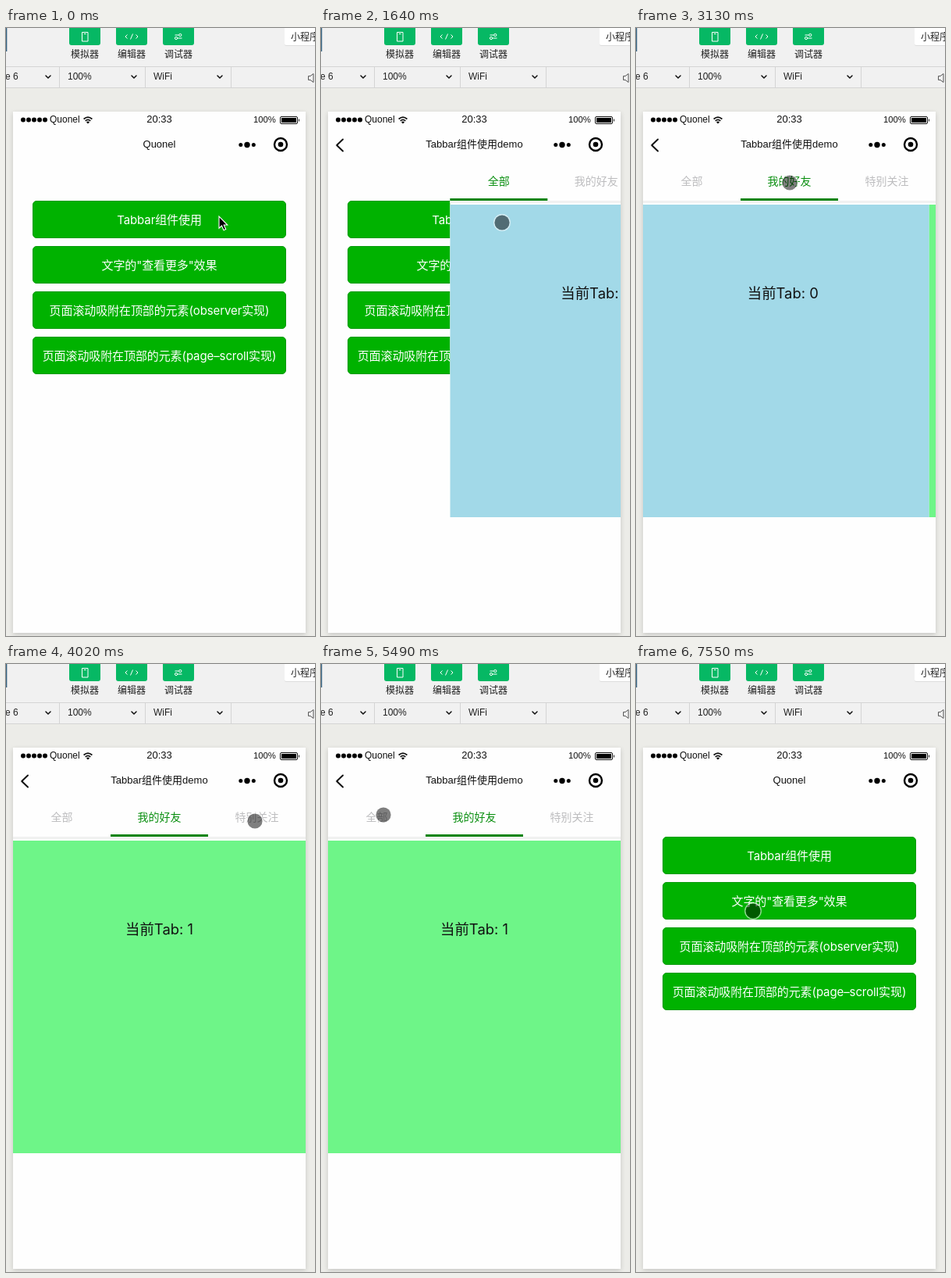
Recreate the animation shown at these times as an HTML page. Size 396x778 px, loop 8 s.

```html
<!DOCTYPE html>
<html lang="zh">
<head>
<meta charset="utf-8">
<title>Tab demo</title>
<style>
html, body { margin: 0; width: 100%; height: 100%; overflow: hidden; background: #ecece8; }
svg { display: block; width: 396px; height: 778px; }
text { font-family: "Liberation Sans", "Noto Sans CJK SC", "Noto Sans CJK", sans-serif; fill: #111; white-space: pre; }
.mid { text-anchor: middle; }
.web { font-family: Inter, "Noto Sans CJK SC", "Noto Sans CJK", sans-serif; }
.btn { font-size: 15px; letter-spacing: -.1px; fill: #fff; }
.tab { font-size: 14px; }
.pane { font-size: 18.4px; }
.tool { font-size: 12px; fill: #222; }
.line { fill: none; stroke: #111; stroke-linecap: round; stroke-linejoin: round; }
</style>
</head>
<body>
<svg id="stage" viewBox="0 0 396 778">
  <defs>
    <clipPath id="screen"><rect x="9" y="171" width="375" height="603"/></clipPath>
    <clipPath id="swiper"><rect x="9" y="226" width="375" height="400"/></clipPath>
    <filter id="soft" x="-10%" y="-10%" width="120%" height="120%"><feGaussianBlur stdDeviation="3"/></filter>
  </defs>

  <rect width="396" height="778" fill="#ecece8"/>
  <rect width="396" height="77" fill="#f1f1f1"/>
  <path d="M0 49.5H396M0 76.5H396M68.5 50V76M178.5 50V76M288.5 50V76" stroke="#d4d4d4"/>
  <rect width="1.3" height="30" fill="#33617f"/>
  <g id="tools"></g>
  <g fill="none" stroke="#fff" stroke-width="1">
    <path d="M97.5 5.500H105V17H97.500ZM100 7.500H102.500"/>
    <path d="M155.500 8.500L153 11L155.500 13.500M166.500 8.500L169 11L166.500 13.500M162.500 7.500L159.500 14.500"/>
    <path d="M216.500 9H221.500M219.500 13H225.500"/>
    <circle cx="223.300" cy="9" r="1.600"/><circle cx="218" cy="13" r="1.600"/>
  </g>
  <rect x="357" y="-4" width="50" height="27" rx="2" fill="#ddd"/>
  <rect x="357" y="-4" width="50" height="26" rx="2" fill="#fff"/>
  <text class="tool" x="365" y="16">小程序</text>
  <text class="tool" x="-1" y="66">e 6</text>
  <text class="tool" x="79" y="66">100%</text>
  <text class="tool" x="189" y="66">WiFi</text>
  <path class="line" stroke-width="1.500" d="M51 61L54 64L57 61M161 61L164 64L167 61M271 61L274 64L277 61"/>
  <path d="M387.500 61.500H390L394 58.500V69.500L390 66.500H387.500Z" fill="none" stroke="#555"/>

  <rect x="9" y="109" width="375" height="667" fill="#000" opacity=".16" filter="url(#soft)"/>
  <rect x="9" y="107" width="375" height="667" fill="#fefefe"/>

  <g id="signal"></g>
  <text x="56" y="121" font-size="12">Quonel</text>
  <g class="line" stroke-width="1.700" style="stroke-linecap:butt">
    <path d="M99.600 116.500Q105 111.800 110.400 116.500M101.700 118.800Q105 116 108.300 118.800"/>
  </g>
  <path d="M105 122.500L102.900 120.300Q105 118.800 107.100 120.300Z"/>
  <text class="mid" x="196.500" y="121" font-size="13">20:33</text>
  <text x="317" y="121" font-size="11.300">100%</text>
  <rect x="351.500" y="113.500" width="22" height="9" rx="1.500" fill="none" stroke="#111"/>
  <path d="M353 115H372V121H353ZM375 116Q377 118 375 120Z"/>

  <text id="title" class="mid" x="196.500" y="153" font-size="13"></text>
  <path id="back" class="line" stroke-width="2" d="M28 142.500L20.200 150L28 157.500"/>
  <circle cx="300.800" cy="149.500" r="2.500"/><circle cx="309" cy="149.500" r="3.700"/><circle cx="317.300" cy="149.500" r="2.500"/>
  <circle cx="352" cy="149" r="8" fill="none" stroke="#000" stroke-width="2.400"/><circle cx="352" cy="149" r="3.300"/>

  <g clip-path="url(#screen)">
    <g id="menu"></g>
    <g id="page">
      <rect x="9" y="171" width="375" height="603" fill="#fefefe"/>
      <rect x="9" y="221" width="375" height="3" fill="#f1f1f1"/>
      <g id="tabs"></g>
      <rect id="bar" x="9" y="218" width="125" height="3" fill="#0a840f"/>
      <g clip-path="url(#swiper)"><g id="panes"></g></g>
    </g>
  </g>

  <g id="cursor">
    <g id="dot">
      <circle r="10.200" fill="none" stroke="#fff" stroke-opacity=".55" stroke-width="1.600"/>
      <circle r="9.600" fill="#000" fill-opacity=".5"/>
    </g>
    <path id="arrow" d="M0 0V15.200L3.500 12L6 17.700L8.700 16.500L6.200 11H10.800Z" fill="#000" stroke="#fff" stroke-width="1.100"/>
  </g>
</svg>
<script>
const LOOP = 8000;
const STEP = 148.1;
const WIDTH = 375;
const $ = id => document.getElementById(id);

function add(parent, tag, attrs, label) {
  const el = document.createElementNS("http://www.w3.org/2000/svg", tag);
  for (const name in attrs) el.setAttribute(name, attrs[name]);
  if (label) el.textContent = label;
  $(parent).append(el);
  return el;
}

["模拟器", "编辑器", "调试器"].forEach((label, i) => {
  const x = 81 + i * 60;
  add("tools", "rect", { x, y: -4, width: 40, height: 26, rx: 3, fill: "#06b864" });
  add("tools", "text", { class: "tool mid", x: x + 20, y: 38 }, label);
});

for (let i = 0; i < 5; i++) add("signal", "circle", { cx: 22 + i * 7, cy: 117.5, r: 3 });

[
  "Tabbar组件使用",
  "文字的\"查看更多\"效果",
  "页面滚动吸附在顶部的元素(observer实现)",
  "页面滚动吸附在顶部的元素(page–scroll实现)"
].forEach((label, i) => {
  const y = 221 + i * 58;
  add("menu", "rect", { x: 34.5, y: y + .5, width: 324, height: 47, rx: 4.5, fill: "#00b200", stroke: "#079b0a" });
  add("menu", "text", { class: "web btn mid", x: 196.5, y: y + 29.5 }, label);
});

const tabs = ["全部", "我的好友", "特别关注"].map((label, i) =>
  add("tabs", "text", { class: "web tab mid", x: 71.5 + i * 125, y: 201 }, label));

["#a2d9e8", "#6ef588", "#f3cd74"].forEach((fill, i) => {
  add("panes", "rect", { x: 9 + i * WIDTH, y: 226, width: WIDTH, height: 400, fill });
  add("panes", "text", { class: "web pane mid", x: 196.5 + i * WIDTH, y: 346 }, "当前Tab: " + i);
});

// All times below count in steps.
const OPEN = 9, CLOSE = 47, SLIDE = 3;
const taps = [[20.7, 1], [27.7, 2], [32.7, 1], [37.6, 0]];
const SWIPE = 3.4;
const path = [
  [0, 273, 241], [2, 273, 241], [3, 262, 238], [4, 242, 243], [5, 232, 249],
  [14, 232, 249], [15, 212, 223], [16, 202, 206], [17, 202, 206], [18, 197, 198],
  [24, 197, 198], [27, 319, 201], [30, 319, 201], [32.5, 199, 194],
  [35, 199, 194], [37, 80, 193], [40, 80, 193], [46, 24, 143],
  [48, 24, 143], [51, 150, 316], [54, 150, 316]
];

const progress = (k, start, length) => Math.min(1, Math.max(0, (k - start) / length));
const smooth = p => p * p * (3 - 2 * p);
const mix = (a, b, p) => a + (b - a) * p;

function cursorAt(k) {
  const i = Math.max(1, path.findIndex(point => point[0] >= k));
  const [k0, x0, y0] = path[i - 1], [k1, x1, y1] = path[i];
  const p = smooth(progress(k, k0, k1 - k0));
  return [mix(x0, x1, p), mix(y0, y1, p)];
}

function tabsAt(k) {
  let active = 0, scroll = 0;
  for (const [start, tab] of taps) {
    if (k < start) break;
    scroll = mix(active, tab, smooth(progress(k, start, SWIPE)));
    active = tab;
  }
  return { active, scroll };
}

function pageShift(k) {
  const shown = k < CLOSE
    ? progress(k, OPEN, SLIDE) ** 1.33
    : 1 - progress(k, CLOSE, SLIDE) ** 1.33;
  return WIDTH * (1 - shown);
}

const move = (id, x, y = 0) => $(id).setAttribute("transform", `translate(${x.toFixed(2)} ${y.toFixed(2)})`);
const show = (id, on) => $(id).setAttribute("visibility", on ? "visible" : "hidden");

function draw(ms) {
  const k = Math.min(53, Math.floor((ms + 5) / STEP));
  const inside = k >= OPEN && k < CLOSE;
  $("title").textContent = inside ? "Tabbar组件使用demo" : "Quonel";
  show("back", inside);
  move("page", pageShift(k));

  const { active, scroll } = tabsAt(k);
  tabs.forEach((tab, i) => tab.style.fill = i === active ? "#0a8f10" : "#bdbdbf");
  move("bar", active * 125);
  move("panes", -scroll * WIDTH);

  const [x, y] = cursorAt(k);
  const arrow = k < 4 || y < 171;   // touch dot only over the web view
  move("cursor", x, y);
  show("arrow", arrow);
  show("dot", !arrow);
}

const begin = performance.now();
function tick() {
  draw((performance.now() - begin) % LOOP);
  requestAnimationFrame(tick);
}
tick();
</script>
</body>
</html>
```
